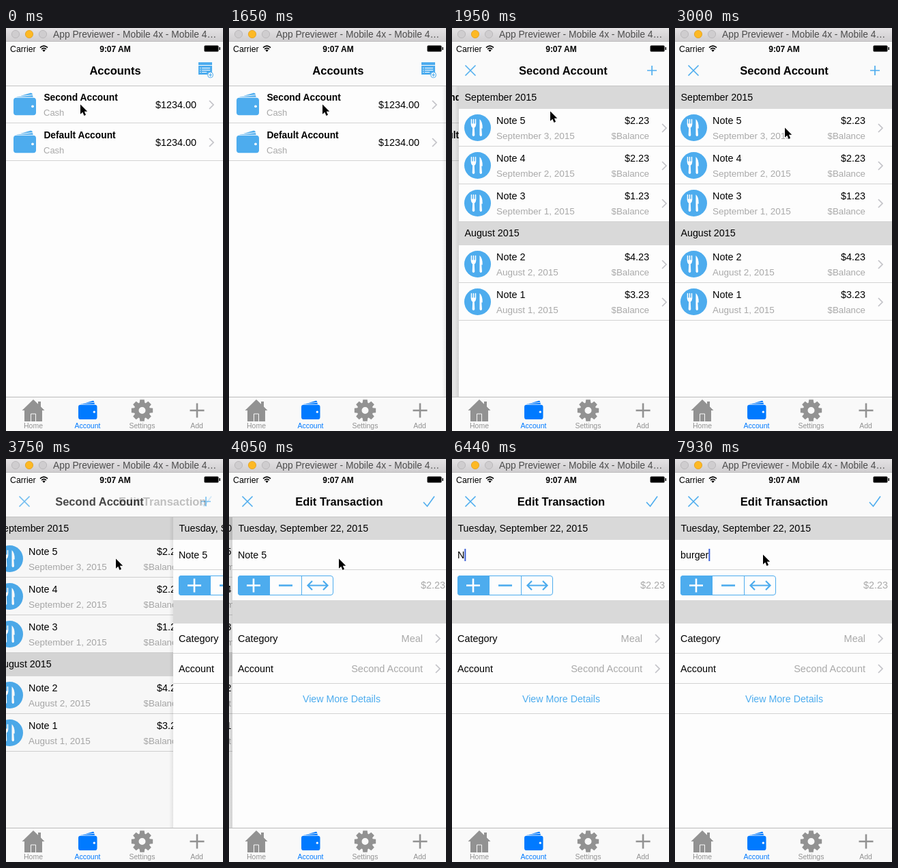
Write an HTML page that moves like this. It is 318 px wide and 588 px high and loops after 8000 ms.

```html
<!DOCTYPE html>
<html lang="en">
<head>
<meta charset="utf-8">
<title>Accounts app</title>
<style>
html, body { margin: 0; width: 100%; height: 100%; overflow: hidden; background: #fdfdfd; }
svg { display: block; width: 318px; height: 588px; }
text { font-family: "Liberation Sans", Arial, sans-serif; white-space: pre; }
</style>
</head>
<body>
<svg id="stage" viewBox="0 0 318 588" xmlns="http://www.w3.org/2000/svg"></svg>
<script>
const LOOP = 8000, WIDTH = 318, FRAME = 150;
const BLUE = '#4dacee', GRAY = '#a9a9a9', ICON = '#929292', LINE = '#d3d3d3', BAND = '#d9d9d9';

const rect = (x, y, w, h, fill, extra = '') =>
  `<rect x="${x}" y="${y}" width="${w}" height="${h}" fill="${fill}" ${extra}/>`;
const path = (d, fill, extra = '') => `<path d="${d}" fill="${fill}" ${extra}/>`;
const stroke = (d, color, width, extra = '') =>
  path(d, 'none', `stroke="${color}" stroke-width="${width}" ${extra}`);
const text = (str, x, y, size, fill = '#000', extra = '') =>
  `<text x="${x}" y="${y}" font-size="${size}" fill="${fill}" ${extra}>${str}</text>`;
const group = (inner, attrs) => `<g ${attrs}>${inner}</g>`;
const END = 'text-anchor="end"', MID = 'text-anchor="middle"', BOLD = 'font-weight="bold"';

const rule = y => rect(0, y, WIDTH, 1, LINE);
const chevron = (x, y) => stroke(`M${x} ${y - 6}l6 6l-6 6`, '#c3c3c8', 1.7);
const band = (y, label, h = 33) =>
  rect(0, y, WIDTH, h, BAND) + text(label, 8.4, y + 21, 14.3);

function wallet(x, y, size, color) {
  return group(
    path('M4 6.5L25 .5Q27 0 27.6 2L28.7 6.5Z', color) +
    stroke('M6 5.6L28 3.4', '#fdfdfd', 1) +
    rect(0, 7.5, 33, 25.5, color, 'rx="4"') +
    '<circle cx="28" cy="20" r="1.9" fill="#fdfdfd"/>',
    `transform="translate(${x} ${y}) scale(${size / 33})"`);
}

function meal(x, y) {
  return group(
    `<circle r="19.5" fill="${BLUE}"/>` +
    stroke('M-9 -12V-5M-6 -12V-5M-3 -12V-5', '#fff', 1.5, 'stroke-linecap="round"') +
    path('M-9.7 -6H-2.3Q-2.3 -1 -4.7 0L-4.2 11Q-6 14 -7.8 11L-7.3 0Q-9.7 -1 -9.7 -6Z', '#fff') +
    path('M3 -12.5Q7.4 -9 7.2 1H5.8L6.5 11Q4.7 14 3 11Z', '#fff'),
    `transform="translate(${x} ${y})"`);
}

function gear(cx, cy) {
  let d = '';
  for (let i = 0; i < 8; i++) {
    [[-.33, 11.8], [-.2, 16], [.2, 16], [.33, 11.8]].forEach(([off, r], k) => {
      const a = i * Math.PI / 4 + off;
      d += `${i + k ? 'L' : 'M'}${(cx + r * Math.sin(a)).toFixed(2)} ${(cy - r * Math.cos(a)).toFixed(2)}`;
    });
  }
  return path(`${d}ZM${cx - 5} ${cy}a5 5 0 1 0 10 0a5 5 0 1 0 -10 0Z`, ICON, 'fill-rule="evenodd"');
}

function accountRow(y, name) {
  return wallet(11, y + 9.3, 33, BLUE) + text(name, 55.4, y + 21, 13.8, '#000', BOLD) +
    text('Cash', 55, y + 43, 13, GRAY) + text('$1234.00', 279, y + 32, 14.4, '#000', END) +
    chevron(298, y + 27) + rule(y + 53);
}

function noteRow(y, name, date, amount) {
  return meal(27.5, y + 27.5) + text(name, 55, y + 22, 14.4) + text(date, 55, y + 43.5, 13.5, GRAY) +
    text(amount, 279, y + 22, 14.4, '#000', END) + text('$Balance', 279, y + 43.5, 13.3, GRAY, END) +
    chevron(298, y + 28) + rule(y + 54);
}

function detailRow(y, label, value) {
  return text(label, 8, y + 27, 14.4) + text(value, 279, y + 27, 14.5, GRAY, END) +
    chevron(298, y + 22) + rule(y + 43);
}

const accountsPage = accountRow(85, 'Second Account') + accountRow(140, 'Default Account');

const notesPage = band(85, 'September 2015') +
  noteRow(118, 'Note 5', 'September 3, 2015', '$2.23') +
  noteRow(173, 'Note 4', 'September 2, 2015', '$2.23') +
  noteRow(228, 'Note 3', 'September 1, 2015', '$1.23') +
  band(283, 'August 2015', 34) +
  noteRow(317, 'Note 2', 'August 2, 2015', '$4.23') +
  noteRow(372, 'Note 1', 'August 1, 2015', '$3.23');

const editPage = band(85, 'Tuesday, September 22, 2015') +
  text('Note 5', 8, 145, 14.3, '#000', 'id="field"') +
  rect(0, 131, 2, 18, '#3f62d6', 'id="caret"') + rule(161) +
  rect(8.5, 170.5, 139, 28, '#fdfdfd', `rx="3.5" stroke="${BLUE}"`) +
  path('M55 170V199H12Q8 199 8 195V174Q8 170 12 170Z', BLUE) +
  stroke('M101.5 170V199', BLUE, 1) +
  stroke('M21 184.5H41M31 174.5V194.5', '#fff', 2.6) +
  stroke('M68 184.5H88', BLUE, 2.6) +
  stroke('M111 184.5H139M117 178L110.5 184.5L117 191M133 178L139.5 184.5L133 191', BLUE, 2.2) +
  text('$2.23', 312, 189, 14.4, GRAY, END) + rect(0, 206, WIDTH, 34, BAND) +
  detailRow(240, 'Category', 'Meal') + detailRow(284, 'Account', 'Second Account') +
  text('View More Details', 160, 355, 14.2, BLUE, MID) + rule(371);

const cross = stroke('M19.5 54.5L34.5 69.5M34.5 54.5L19.5 69.5', BLUE, 1.6);
const addList = rect(282, 50, 20, 4, BLUE) + rect(282, 55, 20, 13, BLUE) +
  stroke('M284 58.5H285.5M287 58.5H299M284 61.5H285.5M287 61.5H299M284 64.5H285.5M287 64.5H294', '#fff', 1) +
  `<circle cx="299.5" cy="68.5" r="4" fill="#fafafa" stroke="${BLUE}"/>` +
  stroke('M297 68.5H302M299.5 66V71', BLUE, 1);
const plus = stroke('M286 62H300M293 55V69', BLUE, 1.7);
const check = stroke('M285 63L290.5 69L301 54.5', BLUE, 1.6);

const screens = [
  { title: 'Accounts', body: accountsPage, buttons: addList },
  { title: 'Second Account', body: notesPage, buttons: cross + plus },
  { title: 'Edit Transaction', body: editPage, buttons: cross + check },
];

const tabLabel = (name, x, color = ICON) => text(name, x, 584, 10.5, color, MID);
const tabs = rect(0, 538, WIDTH, 50, '#f9f9f9') + rect(0, 538, WIDTH, 1, '#bcbcbc') +
  path('M40 542L47 548.7V545H51V552.5L56.5 558H53V574H27V558H23.5Z', ICON) +
  stroke('M36.5 574V563H43.5V574', '#f9f9f9', 1) +
  wallet(106, 543.5, 27.5, '#007aff') + gear(199.5, 558) +
  stroke('M269.5 558H290.5M280 547.5V568.5', ICON, 2.6) +
  tabLabel('Home', 40) + tabLabel('Account', 119.5, '#007aff') +
  tabLabel('Settings', 199.5) + tabLabel('Add', 279.5);

const light = (x, fill, edge) => `<circle cx="${x}" cy="9" r="5.6" fill="${fill}" stroke="${edge}" stroke-width=".8"/>`;
const windowBar = rect(0, 0, WIDTH, 20, 'url(#chrome)') + rect(0, 19, WIDTH, 1, '#bdbbbd') +
  light(14, '#cfcdcf', '#b4b2b4') + light(34, '#fdb924', '#e09e1c') + light(54, '#cfcdcf', '#b4b2b4') +
  text('App Previewer - Mobile 4x - Mobile 4…', 69, 14, 13.8, '#4c4c4c');

const status = text('Carrier', 6, 34.5, 12.3) +
  stroke('M50 28.6Q55.5 23.6 61 28.6M52 31Q55.5 27.8 59 31', '#000', 1.6) +
  path('M53.3 32.4Q55.5 30.6 57.7 32.4L55.5 34.8Z', '#000') +
  text('9:07 AM', 160, 34.5, 12, '#000', `${MID} ${BOLD}`) +
  rect(290.5, 25.5, 21, 9, '#000', 'rx="1.5"') + rect(312.5, 28, 1.5, 4, '#000');

const arrow = path('M0 0V14.2L3.3 11.2L5.5 16.4L8 15.3L5.8 10.3H10.2Z', '#000',
  'stroke="#fff" stroke-width="1.1" stroke-linejoin="round" paint-order="stroke"');

const stage = document.getElementById('stage');
stage.innerHTML =
  `<defs>
    <linearGradient id="chrome" x2="0" y2="1"><stop stop-color="#e4e2e4"/><stop offset="1" stop-color="#cfcdcf"/></linearGradient>
    <linearGradient id="shade"><stop stop-color="#000" stop-opacity="0"/><stop offset="1" stop-color="#000" stop-opacity=".08"/></linearGradient>
    <clipPath id="content"><rect y="85" width="318" height="453"/></clipPath>
  </defs>` +
  rect(0, 0, WIDTH, 588, '#fdfdfd') +
  group(screens.map((s, i) => group(
    rect(-6, 85, 6, 453, 'url(#shade)') + rect(0, 85, WIDTH, 453, '#fdfdfd') + s.body +
    rect(0, 85, WIDTH, 453, '#000', `id="dim${i}"`), `id="page${i}"`)).join(''), 'clip-path="url(#content)"') +
  rect(0, 20, WIDTH, 65, '#fafafa') + rect(0, 84, WIDTH, 1, '#c4c4c4') +
  screens.map((s, i) =>
    text(s.title, 160, 68, 16.5, '#000', `${MID} ${BOLD} id="title${i}"`) +
    group(s.buttons, `id="buttons${i}"`)).join('') +
  status + windowBar + tabs + group(arrow, 'id="cursor"');

const el = id => document.getElementById(id);
const set = (id, attrs) => { for (const k in attrs) el(id).setAttribute(k, attrs[k]); };

const pushStarts = [1648, 3698];
const cursorSteps = [
  [0, 109, 112], [150, 126, 112], [300, 137, 112], [1800, 140, 117], [1950, 144, 122],
  [2100, 148, 124], [2250, 152, 126], [2700, 155, 133], [2850, 159, 141], [3000, 161, 146],
  [4350, 163, 155], [4500, 164, 163], [4800, 145, 155], [4950, 128, 146],
  [5250, 129, 140], [5390, -50, 0], [7930, 129, 140],
];
const typing = [
  [0, 'Note 5'], [5840, 'Note '], [5990, 'Note'], [6140, 'Not'], [6290, 'No'], [6440, 'N'],
  [6590, ''], [6730, 'b'], [7030, 'bur'], [7480, 'burg'], [7630, 'burger'],
];
const latest = (steps, t) => steps.filter(s => s[0] <= t).pop();

// Critically damped spring, from 0 to 1.
function spring(ms) {
  if (ms <= 0) return 0;
  const x = ms * .01745;
  return 1 - (1 + x) * Math.exp(-x);
}

function render(t) {
  const tick = Math.floor(t / FRAME) * FRAME;
  const shown = [1, ...pushStarts.map(start => spring(tick - start)), 0];
  screens.forEach((_, i) => {
    const enter = shown[i], leave = shown[i + 1];
    const visible = enter > 0 && leave < 1;
    const x = Math.round(WIDTH * (1 - enter) - .3 * WIDTH * leave);
    const opacity = enter * Math.max(0, 1 - leave * 1.25);
    set(`page${i}`, { transform: `translate(${x} 0)`, display: visible ? 'inline' : 'none' });
    set(`dim${i}`, { opacity: .1 * leave });
    set(`title${i}`, { x: 160 + 90 * (1 - enter) - 100 * leave, opacity });
    set(`buttons${i}`, { opacity });
  });

  const [, cx, cy] = latest(cursorSteps, t);
  set('cursor', { transform: `translate(${cx} ${cy - .5})` });

  const field = el('field');
  const value = latest(typing, t)[1];
  if (field.textContent !== value) field.textContent = value;
  const end = value ? field.getComputedTextLength() : 0;
  set('caret', { x: 8 + end, opacity: t >= 5250 ? 1 : 0 });
}

function frame() {
  render(performance.now() % LOOP);
  requestAnimationFrame(frame);
}
frame();
</script>
</body>
</html>
```
